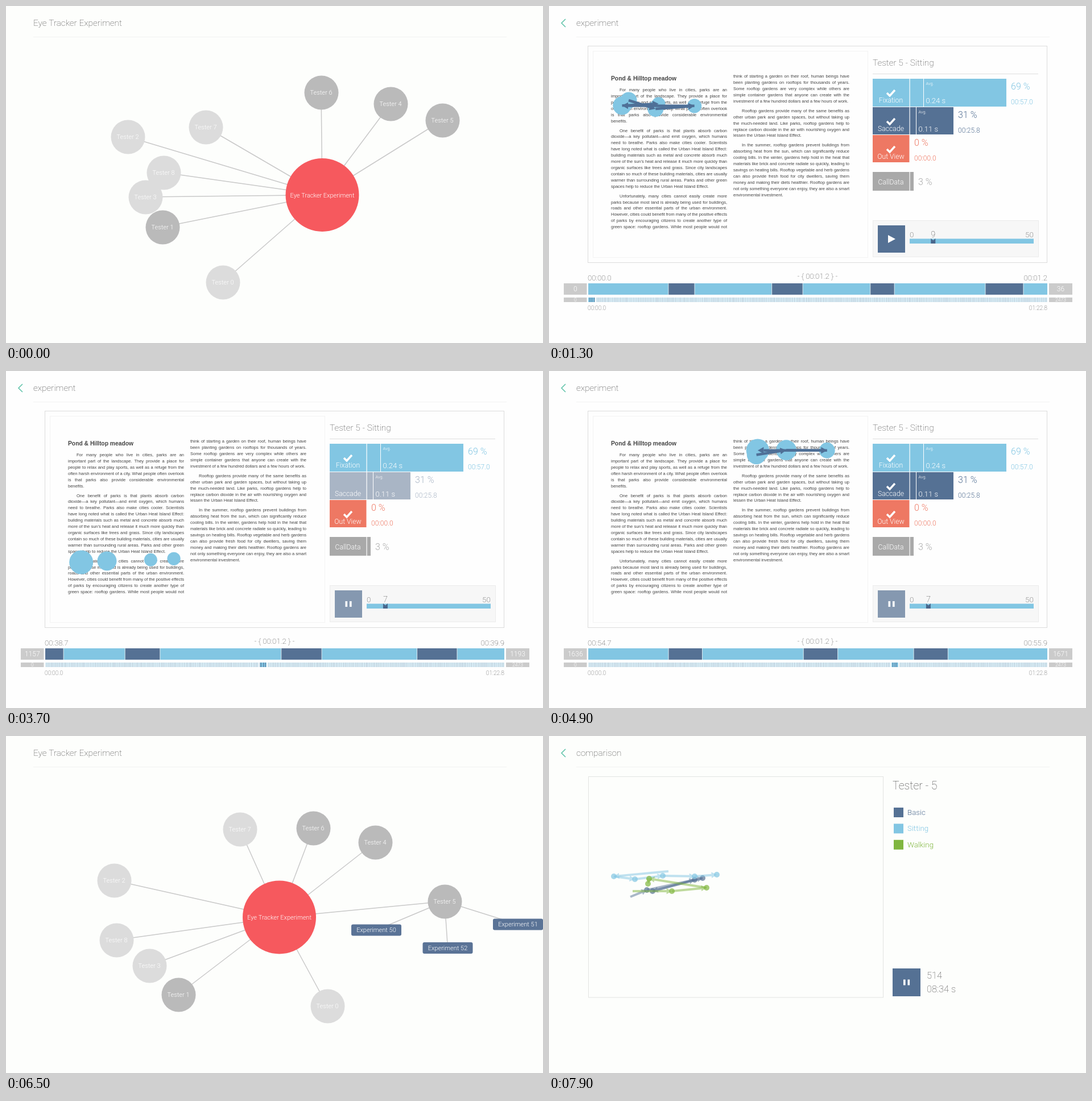
Animation of 944x593 px, one loop 8000 ms. Source, as an HTML page with a canvas:

```html
<!DOCTYPE html>
<html lang="en">
<head>
<meta charset="utf-8">
<title>Gaze study</title>
<style>
  html, body { margin: 0; width: 100%; height: 100%; overflow: hidden; background: #fdfefc; }
  canvas { display: block; }
</style>
</head>
<body>
<canvas id="stage" width="944" height="593"></canvas>
<script>
const ctx = document.getElementById('stage').getContext('2d');
const NAVY = '#557194', SKY = '#82c6e3', RED = '#ee7863', GREEN = '#80b63f', GREY = '#a9a9a9', INK = '#444';
const BAR_X = 69, BAR_W = 807, DURATION = 82.8, SAMPLE_RATE = 29.9;

const lerp = (a, b, k) => a + (b - a) * k;
const pad = (value, width = 2) => String(value).padStart(width, '0');
const clock = s => pad(Math.floor(s / 60)) + ':' + pad((s % 60).toFixed(1), 4);

let seed = 11;
const random = (low, high) => low + (high - low) * (seed = seed * 16807 % 2147483647) / 2147483647;

function box(x, y, w, h, fill) { ctx.fillStyle = fill; ctx.fillRect(x, y, w, h); }
function frame(x, y, w, h, stroke) { ctx.strokeStyle = stroke; ctx.lineWidth = 1; ctx.strokeRect(x, y, w, h); }
function dot(x, y, r, fill) { ctx.fillStyle = fill; ctx.beginPath(); ctx.arc(x, y, r, 0, 7); ctx.fill(); }
function line(points, stroke, width = 1) {
  ctx.strokeStyle = stroke;
  ctx.lineWidth = width;
  ctx.beginPath();
  points.forEach(([x, y]) => ctx.lineTo(x, y));
  ctx.stroke();
}
function shape(points, fill) {
  ctx.fillStyle = fill;
  ctx.beginPath();
  points.forEach(([x, y]) => ctx.lineTo(x, y));
  ctx.fill();
}
function text(str, x, y, size, color, align = 'left') {
  ctx.font = `${color === INK ? 200 : 300} ${size}px Roboto, sans-serif`;
  ctx.textAlign = align;
  ctx.fillStyle = color;
  ctx.fillText(str, x, y);
}
function arrow([x1, y1], [x2, y2], color, width) {
  const a = Math.atan2(y2 - y1, x2 - x1), c = Math.cos(a), s = Math.sin(a), h = width * 1.3;
  const bx = x2 - c * h * 1.8, by = y2 - s * h * 1.8;
  line([[x1, y1], [bx, by]], color, width);
  shape([[x2, y2], [bx - s * h, by + c * h], [bx + s * h, by - c * h]], color);
}
function clipped(x, y, w, h, paint) {
  ctx.save();
  ctx.beginPath();
  ctx.rect(x, y, w, h);
  ctx.clip();
  paint();
  ctx.restore();
}

function page(title, background, back) {
  box(0, 0, 944, 593, background);
  text(title, 48, 35, 15.4, INK);
  line([[48, 54.5], [880, 54.5]], '#f2f3f2');
  if (back) line([[29, 23], [22, 30], [29, 37]], '#62c4aa', 1.6);
}
function playButton(x, y, size, playing, fill) {
  box(x, y, size, size, fill);
  const cx = x + size / 2, cy = y + size / 2;
  if (playing) {
    box(cx - 5.5, cy - 5, 3.6, 10, '#fff');
    box(cx + 2, cy - 5, 3.6, 10, '#fff');
  } else shape([[cx - 6, cy - 7], [cx + 7, cy], [cx - 6, cy + 7]], '#fff');
}

// ---- Tester graph: x, y when closed, then x, y after a tester is opened ----
const HUB = [556, 332.5, 480.5, 319];
const TESTERS = [
  [381, 486, 565, 475], [275, 389, 303, 455], [214, 230, 190, 254],
  [245, 336, 252, 404], [676, 172, 649, 187], [767, 201, 771, 291],
  [554, 152, 540, 162], [351, 213, 411, 164], [277, 293, 194, 359]
];
function graph(k, open) {
  page('Eye Tracker Experiment', '#fdfefc', false);
  const place = ([x1, y1, x2, y2]) => [lerp(x1, x2, k), lerp(y1, y2, k)];
  const hub = place(HUB), nodes = TESTERS.map(place), [tx, ty] = nodes[5];
  const trials = open ? [[tx - 120, ty + 50.5], [tx + 129, ty + 40.5], [tx + 5.5, ty + 82]] : [];
  nodes.forEach(n => line([hub, n], '#c9c9c9', 1.5));
  trials.forEach(n => line([nodes[5], n], '#c9c9c9', 1.5));
  dot(...hub, 64.5, '#f6595e');
  text('Eye Tracker Experiment', hub[0], hub[1] + 4, 11, '#fff', 'center');
  nodes.forEach(([x, y], i) => {
    dot(x + 0.5, y + 0.5, 30, [1, 4, 5, 6].includes(i) ? '#bababa' : '#dcdcdc');
    text('Tester ' + i, x, y + 4, 11, '#fff', 'center');
  });
  trials.forEach(([x, y], i) => {
    ctx.fillStyle = '#5a7396';
    ctx.beginPath();
    ctx.roundRect(x - 44, y - 10, 88, 20, 3);
    ctx.fill();
    text('Experiment ' + (50 + i), x, y + 3.5, 11, '#fff', 'center');
  });
}

// ---- Reading passage; '>' indents a line, '<' leaves it unjustified ----
const LEFT = `>For many people who live in cities, parks are an
important part of the landscape. They provide a place for
people to relax and play sports, as well as a refuge from the
often harsh environment of a city. What people often overlook
is that parks also provide considerable environmental
<benefits.
>One benefit of parks is that plants absorb carbon
dioxide—a key pollutant—and emit oxygen, which humans
need to breathe. Parks also make cities cooler. Scientists
have long noted what is called the Urban Heat Island Effect:
building materials such as metal and concrete absorb much
more of the sun’s heat and release it much more quickly than
organic surfaces like trees and grass. Since city landscapes
contain so much of these building materials, cities are usually
warmer than surrounding rural areas. Parks and other green
<spaces help to reduce the Urban Heat Island Effect.
>Unfortunately, many cities cannot easily create more
parks because most land is already being used for buildings,
roads and other essential parts of the urban environment.
However, cities could benefit from many of the positive effects
of parks by encouraging citizens to create another type of
green space: rooftop gardens. While most people would not`;
const RIGHT = `think of starting a garden on their roof, human beings have
been planting gardens on rooftops for thousands of years.
Some rooftop gardens are very complex while others are
simple container gardens that anyone can create with the
<investment of a few hundred dollars and a few hours of work.
>Rooftop gardens provide many of the same benefits as
other urban park and garden spaces, but without taking up
the much-needed land. Like parks, rooftop gardens help to
replace carbon dioxide in the air with nourishing oxygen and
<lessen the Urban Heat Island Effect.
>In the summer, rooftop gardens prevent buildings from
absorbing heat from the sun, which can significantly reduce
cooling bills. In the winter, gardens help hold in the heat that
materials like brick and concrete radiate so quickly, leading to
savings on heating bills. Rooftop vegetable and herb gardens
can also provide fresh food for city dwellers, saving them
money and making their diets healthier. Rooftop gardens are
not only something everyone can enjoy, they are also a smart
<environmental investment.`;
function column(body, x, y) {
  ctx.font = '7.5px "Liberation Sans", Arial, sans-serif';
  ctx.textAlign = 'left';
  ctx.fillStyle = INK;
  for (const raw of body.split('\n')) {
    const indent = raw[0] === '>' ? 15 : 0, words = raw.replace(/^[<>]/, '').split(' ');
    const spare = 204 - indent - ctx.measureText(words.join(' ')).width;
    const extra = raw[0] === '<' ? 0 : spare / (words.length - 1);
    let cx = x + indent;
    y += indent ? 17 : 10.9;
    for (const word of words) {
      ctx.fillText(word, cx, y);
      cx += ctx.measureText(word + ' ').width + extra;
    }
  }
}

// ---- Gaze recording: fixations that step along each text line, then sweep back ----
const track = [];
for (let t = 0, x = 140, from = [140, 177]; t < DURATION;) {
  const right = t > 48, start = right ? 345 : 125, end = start + 172;
  const y = (right ? 126 + (t - 48) * 2.6 : 174 + t * 4.1) + random(-8, 8);
  const hold = random(0.12, 0.32), jump = random(0.05, 0.11);
  track.push({ t, hold, jump, from, to: [x, y] });
  from = [x, y];
  t += hold + jump;
  x += random(45, 95);
  if (x > end || x < start) x = start + random(0, 25);
}

// Playback runs on from a skip at a constant rate until paused, then the window is widened
const startAt = step => step ? Math.min(22.7 + (step - 3) * 16 / 3, 60.93) : 0;
const lengthAt = step => step > 10 ? 7.54 : 1.2;

function statRow(y, h, right, split, label, color, checked, percent, time, average) {
  box(569, y, right - 569, h, color);
  box(633.5, y, 1.2, h, '#fff');
  if (average) {
    box(split, y, 1, h, '#fff');
    text('Avg.', split + 4.5, y + 11, 7.5, '#fff');
    text(average, split + 4.5, y + 43, 13, '#fff');
  }
  if (checked) line([[594, y + 25], [599, y + 30], [608, y + 20]], '#fff', 3.5);
  text(label, 601, y + (time ? 42 : 22), 12.2, '#fff', 'center');
  text(percent, right + 8, y + (time ? 19 : 23), 16, color);
  if (time) text(time, right + 8, y + 45, 12, color);
}

function sideLabels(x, w, main, mini) {
  box(x, 488, w, 20, '#cbcbcb');
  box(x, 513, w, 8, '#cbcbcb');
  text(main, x + w / 2, 502, 12, '#fff', 'center');
  text(mini, x + w / 2, 520, 8.5, '#fff', 'center');
}

function stripes(y, h, start, length, fix, sac, edge) {
  const scale = BAR_W / length;
  box(BAR_X, y, BAR_W, h, fix);
  for (const e of track) {
    const x = BAR_X + (e.t + e.hold - start) * scale, w = e.jump * scale;
    box(x, y, w, h, sac);
    if (edge) {
      box(x - 0.5, y, 1, h, edge);
      box(x + w - 0.5, y, 1, h, edge);
    }
  }
}

function timeline(start, length) {
  const end = start + length;
  text(clock(start), 68, 483, 13.3, INK);
  text(clock(end), 876, 483, 13.3, INK, 'right');
  text(`- { ${clock(length)} } -`, 472, 479.5, 13.3, INK, 'center');
  sideLabels(26, 40.5, Math.round(start * SAMPLE_RATE), '0');
  sideLabels(879, 41, Math.round(end * SAMPLE_RATE), '2473');
  clipped(BAR_X, 488, BAR_W, 20, () => stripes(488, 20, start, length, SKY, NAVY, '#dcebf2'));

  const x = BAR_X + start / DURATION * BAR_W, w = length / DURATION * BAR_W;
  clipped(BAR_X, 513, BAR_W, 8, () => stripes(513, 8, 0, DURATION, '#d6ebf4', '#bccad7'));
  box(x - 2, 512, w + 4, 10, '#fff');
  clipped(x, 513, w, 8, () => stripes(513, 8, 0, DURATION, SKY, NAVY));
  text(clock(0), 68, 534.5, 10.3, INK);
  text(clock(DURATION), 876, 534.5, 10.3, INK, 'right');
}

function player(count, playing) {
  box(569, 377, 292, 65, '#f7f7f7');
  frame(569.5, 377.5, 291, 64, '#ececec');
  playButton(578, 386, 48, playing, playing ? '#8598b0' : NAVY);
  text('0', 634, 407, 13.5, '#999');
  text('50', 852, 407, 13.5, '#999', 'right');
  box(634, 409.5, 218, 8.5, SKY);
  const knob = 637.5 + Math.min(count, 51) * 4.2;
  shape([[knob - 4, 409], [knob, 412.5], [knob + 4, 409], [knob + 4, 418], [knob - 4, 418]], '#49678c');
  if (count > 44) box(knob - 10, 395, 19, 13, '#f7f7f7');
  text(count, knob, 407, 14.5, INK, 'center');
}

function experiment(step) {
  const start = startAt(step), length = lengthAt(step);
  const seen = track.filter(e => e.t + e.hold > start && e.t < start + length);
  const saccades = step < 5 || step > 8;

  page('experiment', '#fefefe', true);
  frame(68.5, 70.5, 807, 381, '#dcdcdc');
  frame(77.5, 79.5, 483, 363, '#f3f3f3');
  ctx.font = 'bold 10.3px "Liberation Sans", Arial, sans-serif';
  ctx.textAlign = 'left';
  ctx.fillStyle = INK;
  ctx.fillText('Pond & Hilltop meadow', 109, 131);
  column(LEFT, 109, 133);
  column(RIGHT, 324, 115.3);
  seen.forEach(e => dot(...e.to, 2 + e.hold * 60, SKY));
  if (saccades) seen.slice(1).forEach(e => arrow(e.from, e.to, '#4f7097', 4.5));

  text('Tester 5 - Sitting', 569, 105, 15.4, INK);
  line([[569, 119.5], [860, 119.5]], '#dedede');
  statRow(128, 49, 804, 658, 'Fixation', SKY, true, '69 %', '00:57.0', '0.24 s');
  statRow(178, 48, 711, 645, 'Saccade', saccades ? NAVY : '#a9b5c5', saccades, '31 %', '00:25.8', '0.11 s');
  statRow(227, 48, 634, 0, 'Out View', RED, true, '0 %', '00:00.0');
  statRow(292, 33, 641, 0, 'CallData', GREY, false, '3 %');
  player(seen.length * 2 - 1, step > 0 && step < 11);
  timeline(start, length);
}

// ---- Three recordings compared: each one a path of gaze points ----
const RUNS = [
  { name: 'Basic', color: NAVY, path: [[143, 283], [172, 271], [270, 250], [182, 273], [256, 253]] },
  { name: 'Sitting', color: SKY, path: [[210, 238], [114, 247], [151, 252], [200, 246], [256, 247], [295, 244]] },
  { name: 'Walking', color: GREEN, path: [[147, 273], [216, 273], [277, 267], [176, 251], [174, 260]] }
];
function comparison(step) {
  const back = 2 - step, count = 514 - back * 18;
  page('comparison', '#fdfefc', true);
  frame(69.5, 71.5, 518, 388.5, '#e2e4e2');
  ctx.save();
  ctx.translate(12 * back, -10 * back);
  for (const { color, path } of RUNS) {
    ctx.globalAlpha = 0.5;
    path.slice(1).forEach((p, i) => arrow(path[i], p, color, 4));
    ctx.globalAlpha = 0.7;
    path.slice(1).forEach(p => dot(...p, 5, color));
  }
  ctx.restore();
  text('Tester - 5', 604, 94, 19.5, INK);
  RUNS.forEach(({ name, color }, i) => {
    box(606, 126 + i * 28.4, 17, 17, color);
    text(name, 630, 139 + i * 28.4, 13.3, color);
  });
  playButton(604, 409, 49, true, NAVY);
  text(count, 664, 427, 16.5, INK);
  text(`${pad(Math.floor(count / 60))}:${pad(count % 60)} s`, 664, 451, 16.5, INK);
}

function draw() {
  const t = performance.now() % 8000;
  if (t < 500) graph(0, false);
  else if (t < 1300) graph(0.42, true);
  else if (t < 6500) experiment(Math.floor((t - 1300) / 400));
  else if (t < 7300) graph(1, true);
  else comparison(Math.floor((t - 7300) / 300));
  requestAnimationFrame(draw);
}
draw();
</script>
</body>
</html>
```
